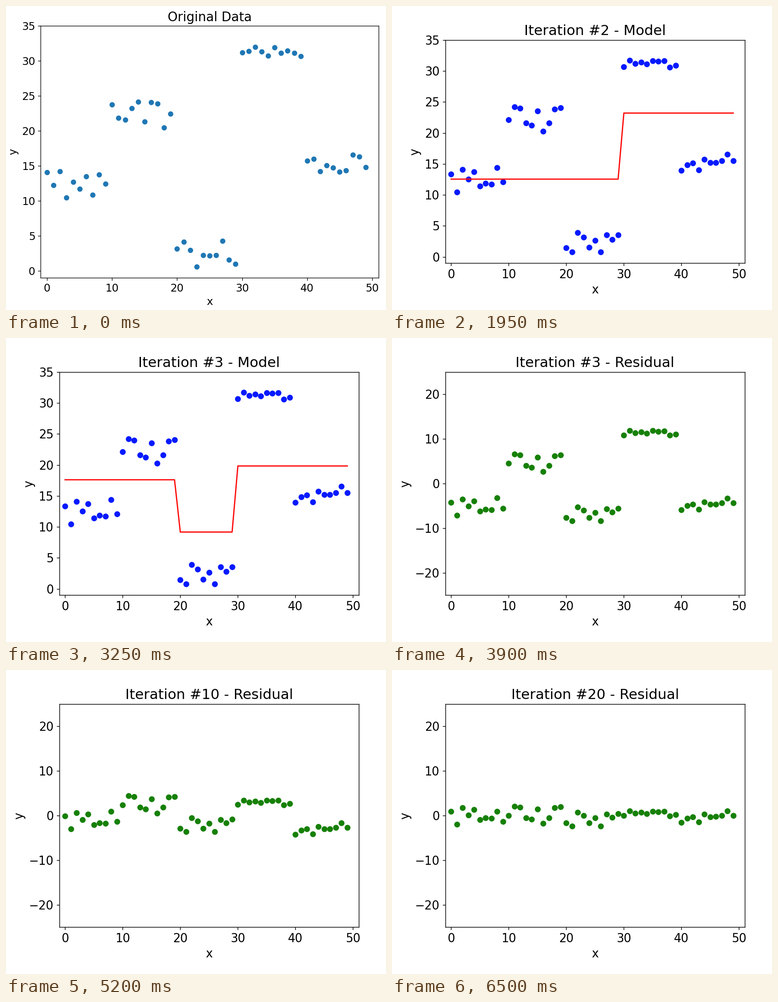
A matplotlib script that plays this animation: 825x660 px, repeating every 7150 ms.

```python
import numpy as np
import matplotlib.pyplot as plt
from matplotlib.animation import FuncAnimation

W, H = 825, 660
BLUE, RED, GREEN = "#0519ff", "#ff0a0a", "#168006"
ROUNDS = [1, 2, 3, 10, 20]

plt.rcParams["font.family"] = "DejaVu Sans"
fig = plt.figure(figsize=(W / 100, H / 100), dpi=100, facecolor="white")

x = np.arange(50)
rng = np.random.default_rng(4)
CENTERS = np.array([[12.57], [22.65], [2.42], [31.26], [15.17]])
SPREADS = np.array([[2.1], [2.3], [2.2], [0.9], [1.5]])


def sample():
    """Five plateaus of ten points with zero-mean noise."""
    noise = rng.uniform(-1, 1, (5, 10))
    noise -= noise.mean(axis=1, keepdims=True)
    return (CENTERS + SPREADS * noise).ravel()


def stump(res):
    """Best two-level fit to the residual."""
    def gain(s):
        return s * res[:s].mean() ** 2 + (50 - s) * res[s:].mean() ** 2
    s = max(range(1, 50), key=gain)
    return np.where(x < s, res[:s].mean(), res[s:].mean())


def boost(y, rounds):
    """Model after each round: the mean first, then one more stump each."""
    models = [np.full(50, y.mean())]
    for _ in range(rounds - 1):
        models.append(models[-1] + stump(y - models[-1]))
    return models


raw, y = sample(), sample()
models = boost(y, ROUNDS[-1])


def panel(box, k, title, values, color, ylim=(-1, 35), step=5, model=None):
    """Draw one chart; box is left, top, right, bottom in px, k scales points."""
    l, t, r, b = box
    size = 14.03 * k
    ax = fig.add_axes([l / W, 1 - b / H, (r - l) / W, (b - t) / H])
    ax.plot(x, values, "o", color=color, ms=6 * k, mew=k)
    if model is not None:
        ax.plot(x, model, color=RED, lw=1.5 * k)
    ax.set(xlim=(-1, 51), ylim=ylim, xticks=range(0, 51, 10))
    ax.set_yticks(range(-(-ylim[0] // step) * step, ylim[1] + 1, step))
    ax.tick_params(labelsize=size, length=3.5 * k, width=0.8 * k, pad=3.5 * k)
    for s in ax.spines.values():
        s.set_linewidth(0.8 * k)
    ax.set_xlabel("x", fontsize=size, labelpad=4 * k)
    ax.set_ylabel("y", fontsize=size, labelpad=4 * k)
    ax.set_title(title, fontsize=1.2 * size, pad=6 * k)


def draw(i):
    fig.clear()
    if i == 0:
        panel((75, 42.5, 809, 590), 1.184, "Original Data", raw, "#1f77b4")
        return
    n = ROUNDS[(i - 1) // 2]
    model = models[n - 1]
    box, k = (115.9, 74, 765.9, 558), 1.31
    if i % 2:
        kind = "Mean" if n == 1 else "Model"
        panel(box, k, f"Iteration #{n} - {kind}", y, BLUE, model=model)
    else:
        panel(box, k, f"Iteration #{n} - Residual", y - model, GREEN,
              ylim=(-25, 25), step=10)


anim = FuncAnimation(fig, draw, frames=1 + 2 * len(ROUNDS), interval=650,
                     init_func=lambda: None, repeat=True, repeat_delay=0)
plt.show()
```
